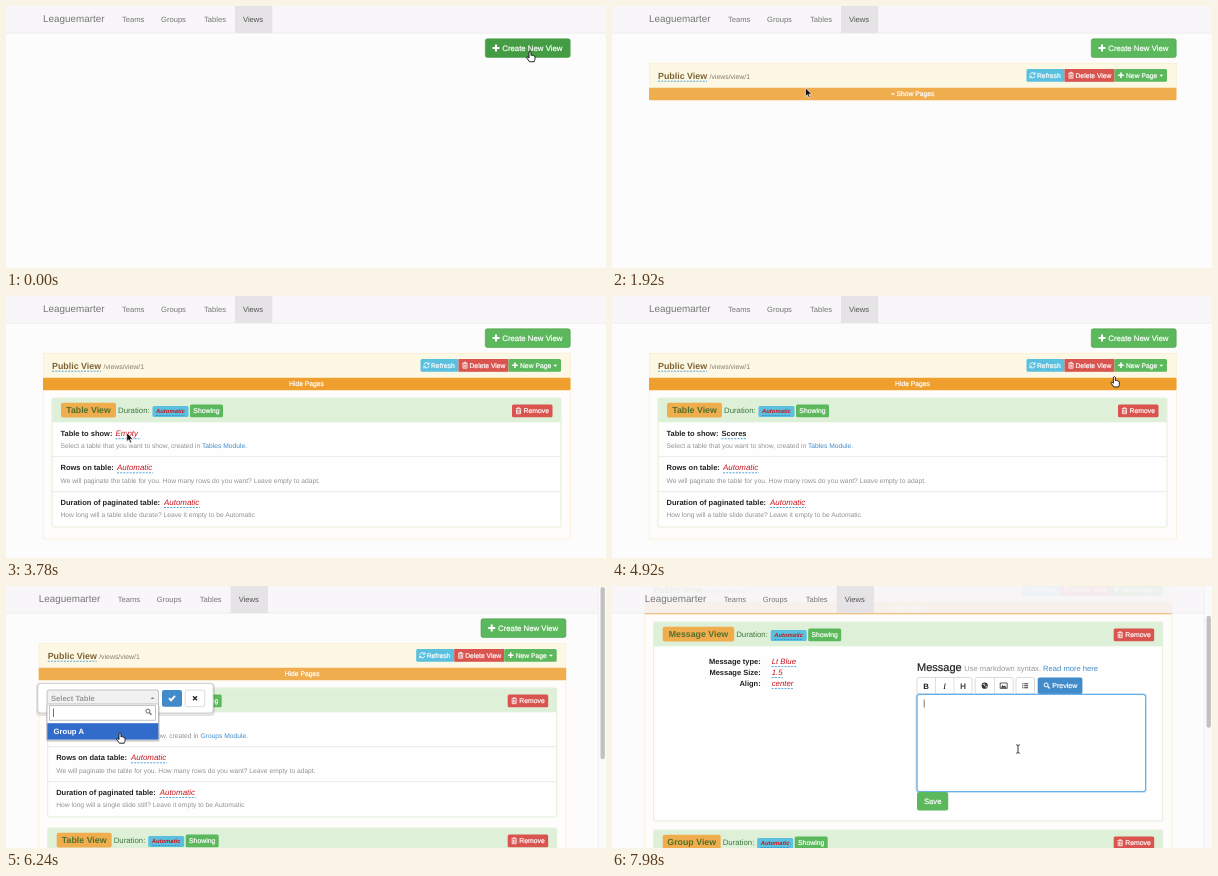
Write an HTML page that moves like this. It is 600 px wide and 262 px high and loops after 8000 ms.

```html
<!DOCTYPE html>
<html lang="en">
<head>
<meta charset="utf-8">
<title>View editor</title>
<style>
  html, body { margin: 0; width: 100%; height: 100%; overflow: hidden; background: #fdfcfd; }
  svg { display: block; width: 600px; height: 262px; }
  text { font-family: "Liberation Sans", Arial, sans-serif; text-rendering: geometricPrecision; white-space: pre; }
  .bold { font-weight: 700; }
  .italic { font-style: italic; }
  .mid { text-anchor: middle; }
  .end { text-anchor: end; }
  .solid { stroke: currentColor; stroke-width: .2; }
</style>
</head>
<body>
<svg id="stage" viewBox="0 0 600 262" xmlns="http://www.w3.org/2000/svg"></svg>
<script>
const C = {
  green: '#5cb85c', greenDark: '#449d44', red: '#d9534f', cyan: '#5bc0de', orange: '#f0ad4e',
  orangeDark: '#ee9f2e', blue: '#428bca', focus: '#66afe9', leaf: '#3c763d', value: '#c9151e',
  ink: '#333', muted: '#999', cream: '#fcf8e3', creamLine: '#faebcc', mint: '#dff0d8', mintLine: '#d6e9c6'
};
const NAV = [[116, 'Teams'], [155, 'Groups'], [198, 'Tables'], [237, 'Views']];
const MENU = ['Table View', 'Group View', 'Message View'];

// Drawing helpers
const rect = (x, y, w, h, fill, more = '') => `<rect x="${x}" y="${y}" width="${w}" height="${h}" fill="${fill}" ${more}/>`;
const text = (x, y, size, str, fill, cls = '') =>
  `<text x="${x}" y="${y}" font-size="${size}" fill="${fill}" color="${fill}" class="${cls}">${str}</text>`;
const group = (id, body) => `<g id="${id}">${body}</g>`;
const dashes = (x, y, w) => `<path d="M${x} ${y}h${w}" stroke="#2a8fd0" stroke-width=".8" stroke-dasharray="2 1.2"/>`;
const stroke = (d, color, w = 1) => `<path d="${d}" fill="none" stroke="${color}" stroke-width="${w}"/>`;
const at = (x, y, body) => `<g transform="translate(${x} ${y})">${body}</g>`;
const box = (x, y, w, h, line = '#ccc', r = 2) => rect(x, y, w, h, '#fff', `rx="${r}" stroke="${line}" stroke-width=".7"`);

const icon = {
  plus: (x, y, s = 1) => at(x, y, stroke(`M${-3.5 * s} 0h${7 * s}M0 ${-3.5 * s}v${7 * s}`, '#fff', 2 * s)),
  refresh: (x, y) => at(x, y, stroke('M-2.6-.5A2.7 2.7 0 0 1 2-1.8M2.6.5A2.7 2.7 0 0 1-2 1.8M2.6-3v2h-2M-2.6 3v-2h2', '#fff', .9)),
  trash: (x, y) => at(x, y, stroke('M-2.7-2h5.4M-1-2v-1h2v1M-2-1.4v4.3h4v-4.3M-.7-.8v2.8M.7-.8v2.8', '#fff', .8)),
  caret: (x, y, fill = '#fff', up = 1) => at(x, y, `<path d="M-2 ${-up}h4L0 ${up}z" fill="${fill}"/>`),
  search: (x, y, color) => at(x, y, `<circle cx="-.6" cy="-.6" r="2" fill="none" stroke="${color}"/>` + stroke('M1 1l2 2', color, 1.3)),
  cross: (x, y, color, s = 2) => at(x, y, stroke(`M${-s}-${s}L${s} ${s}M${s}-${s}L${-s} ${s}`, color, 1.3)),
  check: (x, y) => at(x, y, stroke('M-3 0L-1 2.2 3-2.4', '#fff', 1.8)),
  globe: (x, y) => at(x, y, `<circle r="3.1" fill="#333"/>` + stroke('M-2-.8l1.4-1 1 .9-.8 1.2M.8.6l1.3.2-.9 1.2', '#fff', .8)),
  picture: (x, y) => at(x, y, stroke('M-3.5-2.7h7v5.4h-7z', '#333', .8) + '<path d="M-2.8 2L-1-.7.2.7 1.3-.3 2.8 2z" fill="#333"/>'),
  list: (x, y) => at(x, y, stroke('M-3-2h1.2M-1-2h4M-3 0h1.2M-1 0h4M-3 2h1.2M-1 2h4', '#333', 1.1))
};

const navbar = () =>
  rect(0, 0, 600, 27, '#f8f6f8', 'opacity=".93"') + rect(0, 26.8, 600, .6, '#e6e3e6') +
  group('navItems', rect(229, 0, 37.3, 27, '#e5e3e5') + text(37, 16.3, 9.9, 'Leaguemarter', '#777') +
    NAV.map(([x, s]) => text(x, 15.8, 7.6, s, s === 'Views' ? '#555' : '#777')).join(''));

const viewHeader = () =>
  rect(37.2, 57.2, 527, 29, C.cream, `stroke="${C.creamLine}" stroke-width=".6"`) +
  group('plainTitle', text(46, 72.8, 8.9, '', '#7d6235', 'bold titleText') +
    dashes(46, 75.2, 49) + text(97.5, 72.8, 6.9, '/views/view/1', '#867b70')) +
  group('titleForm', rect(45, 62, 93, 19, C.focus, 'rx="3" opacity=".3"') + box(46, 63, 91, 17, C.focus) +
    group('selection', rect(51, 67.5, 37, 9, '#a5cdf4')) +
    `<text id="typed" x="51.5" y="74.3" font-size="6.8" fill="#333" class="bold"></text>` +
    '<circle cx="130" cy="71.7" r="2.8" fill="none" stroke="#aaa"/>' + icon.cross(130, 71.7, '#aaa', 1.1) +
    text(139, 74.2, 6.9, '/views/view/1', '#867b70')) +
  rect(414.5, 63, 38, 12.8, C.cyan, 'rx="1.5"') + rect(452.5, 63, 50, 12.8, C.red) +
  `<rect id="newPage" x="502.5" y="63" width="52.5" height="12.8" rx="1.5"/>` +
  icon.refresh(420.5, 69.3) + icon.trash(459, 69.3) + icon.plus(509, 69.3, .8) + icon.caret(549.3, 69.8) +
  [[425, 'Refresh'], [463.5, 'Delete View'], [514, 'New Page']]
    .map(([x, s]) => text(x, 71.8, 6.75, s, '#fff', 'solid')).join('');

const pagesBar = () => group('bar',
  `<rect id="barFill" x="37" y="81.7" width="527.5" height="12.5" rx="1"/>` +
  group('barFocus', rect(37.2, 81.9, 527, 12.1, 'none', 'rx="1" stroke="#5c9dd8" stroke-width="1.6"')) +
  group('showPages', icon.caret(281, 88.3) + text(303.5, 90.4, 6.77, 'Show Pages', '#fff', 'mid solid')) +
  group('hidePages', text(300.5, 90.4, 6.77, 'Hide Pages', '#fff', 'mid solid')));

function pageFrame(name, labelWidth, height) {
  const status = dashes(150, 119.5, 29) ;
  return rect(46, 102, 509, height, '#fefefe', `stroke="${C.mintLine}" stroke-width=".7" rx="1.5"`) +
    rect(46.3, 102.3, 508.4, 24, C.mint) +
    rect(55, 106.8, labelWidth, 14.7, C.orange, 'rx="2"') +
    text(55 + labelWidth / 2, 117.2, 8.8, name, '#50702c', 'bold mid') +
    at(labelWidth - 55, 0, text(112, 117, 7.8, 'Duration:', C.leaf) +
      rect(146.5, 110, 36, 11, C.cyan, 'rx="1.5"') + text(150, 117.4, 5.9, 'Automatic', C.value, 'bold italic') + status +
      rect(184, 108.5, 33, 12.7, C.green, 'rx="1.5"') + text(200.5, 117.3, 6.85, 'Showing', '#fff', 'mid solid')) +
    rect(506, 108.5, 40.5, 12.7, C.red, 'rx="1.5"') + icon.trash(512.5, 114.8) +
    text(517.5, 117.3, 6.85, 'Remove', '#fff', 'solid');
}

const row = (y, label, note, valueX) =>
  text(54.5, y, 7.5, label, '#222', 'bold') + text(54.5, y + 12.7, 6.7, note, '#929292') +
  (valueX ? text(valueX, y, 7.95, 'Automatic', C.value, 'italic') + dashes(valueX, y + 2.8, 36) : '');

const listPage = (kind, name, labelWidth, chosen, wide, second, third) => group(kind + 'Page',
  pageFrame(name, labelWidth, 129) +
  [160.5, 195.5].map(y => rect(46, y, 509, .6, '#dcdfdc')).join('') +
  row(139.7, name.split(' ')[0] + ' to show:',
    `Select a ${kind} that you want to show, created in <tspan fill="${C.blue}">${name.split(' ')[0]}s Module.</tspan>`) +
  group(kind + 'Empty', text(wide, 139.7, 7.95, 'Empty', C.value, 'italic') + dashes(wide, 142.7, 24)) +
  group(kind + 'Chosen', text(wide, 139.7, 7.5, chosen, '#222', 'bold') + dashes(wide, 142.7, 25)) +
  row(174, ...second) + row(208.7, ...third));

const PAGINATE = 'We will paginate the table for you. How many rows do you want? Leave empty to adapt.';
const messagePage = () => group('messagePage',
  pageFrame('Message View', 71.5, 199) +
  [['Message type:', 'Lt Blue', 25], ['Message Size:', '1.5', 11], ['Align:', 'center', 22]].map(([k, v, w], i) =>
    text(153, 144 + 11 * i, 7.5, k, '#222', 'bold end') + text(164, 144 + 11 * i, 7.8, v, C.value, 'italic') +
    dashes(164, 146.6 + 11 * i, w)).join('') +
  text(309.3, 150.5, 11, 'Message', '#222', 'solid') +
  text(356.5, 150.5, 7.6, `Use markdown syntax. <tspan fill="${C.blue}">Read more here</tspan>`, '#999') +
  box(309.3, 157.5, 55, 16.5) + box(367.5, 157.5, 38, 16.5) + box(408.3, 157.5, 18.5, 16.5) +
  [327.7, 346, 386.5].map(x => rect(x, 157.5, .6, 16.5, '#ccc')).join('') +
  text(318.5, 168.5, 7.8, 'B', '#222', 'bold mid') +
  `<text x="337" y="168.5" font-size="8" class="italic mid" style="font-family:'Liberation Serif',serif">I</text>` +
  text(355.5, 168.5, 7.8, 'H', '#222', 'mid solid') +
  icon.globe(377, 165.7) + icon.picture(396, 165.7) + icon.list(417.5, 165.7) +
  rect(430, 157.5, 44.7, 16.7, C.blue, 'rx="2"') + icon.search(439, 165.5, '#fff') + text(444.5, 168.3, 7.1, 'Preview', '#fff', 'solid') +
  box(309.3, 174.5, 228.5, 97, '#bbb') +
  group('areaFocus', rect(308.8, 174, 229.5, 98, 'none', `rx="3" stroke="${C.focus}" stroke-width="2" opacity=".35"`) +
    rect(309.3, 174.5, 228.5, 97, 'none', `rx="2" stroke="${C.focus}"`) + rect(316.1, 179.5, .7, 8, '#444')) +
  rect(309.3, 272, 31.2, 18.5, C.green, 'rx="2"') + text(325, 284, 7.7, 'Save', '#fff', 'mid solid'));

const menu = () => group('menu',
  rect(466, 79, 90, 51, '#000', 'rx="3" opacity=".08"') + box(465, 77, 90, 50.5, '#ccc') +
  '<rect id="menuHover" x="465.4" width="89.2" height="14.6" fill="#f0f0f0"/>' +
  MENU.map((s, i) => text(476, 90 + 14.6 * i, 7.6, s, C.ink)).join(''));

const popover = () => group('popover',
  rect(30, 97, 179, 33, '#000', 'rx="4" opacity=".1"') + box(31.8, 97.3, 175.4, 29.7, '#bbb', 3) +
  rect(41, 104, 111.5, 15.5, '#f1f1f1', 'stroke="#aaa" stroke-width=".7" rx="2"') +
  '<text id="choice" x="45" y="114.7" font-size="7.6" class="bold"></text>' +
  rect(156, 104, 20, 16.7, C.blue, 'rx="2"') + icon.check(166, 112.2) +
  box(179.2, 104, 19.6, 16.7) + icon.cross(189, 112.3, '#222') +
  group('drop', icon.caret(146.5, 112, '#888', -1) +
    rect(40, 119, 114, 37, '#000', 'rx="2" opacity=".12"') + box(41, 118, 111.5, 36, '#aaa', 1) +
    box(43.5, 119.7, 106, 14.5, '#aaa', 0) + rect(47, 122.5, .7, 8.5, '#333') + icon.search(142.5, 125.7, '#666') +
    rect(41.3, 137.2, 111, 16.4, '#316ccb') + '<text id="option" x="47.5" y="147.6" font-size="7.7" fill="#fff" class="bold"></text>'));

const cursors = () => group('cursor',
  group('hand', '<path d="M-1 .6Q0-.9 1 .6V4l.5-.3q.9-.4 1.2.4.9-.3 1.2.5 1.1-.2 1.1.9v2.2q0 1-.7 1.6V10.2H-.6L-3.2 6.6q-.6-1 .4-1.2.7 0 1.8 1.1z" fill="#fff" stroke="#111" stroke-width=".9"/>') +
  group('arrow', '<path d="M0 0v9l2.1-1.9 1.4 3.2 1.5-.7-1.4-3.1h2.9z" fill="#111" stroke="#fff" stroke-width=".7"/>') +
  group('beam', stroke('M-1.8-4.2Q0-4.2 0-3.2V3.2Q0 4.2-1.8 4.2M1.8-4.2Q0-4.2 0-3.2M0 3.2Q0 4.2 1.8 4.2', '#222', .9)));

stage.innerHTML = rect(0, 0, 600, 262, '#fdfcfd') +
  group('content',
    '<rect id="create" x="479.3" y="32.8" width="84.9" height="18.6" rx="2" stroke="#449d44" stroke-width=".6"/>' +
    icon.plus(490, 42) + text(496.3, 44.8, 7.8, 'Create New View', '#fff', 'solid') +
    group('view',
      `<rect id="body" x="37.2" y="88" width="527" fill="#fefdfb" stroke="${C.creamLine}" stroke-width=".7"/>` +
      viewHeader() + pagesBar() +
      listPage('table', 'Table View', 55, 'Scores', 109.5,
        ['Rows on table:', PAGINATE, 111],
        ['Duration of paginated table:', 'How long will a table slide durate? Leave it empty to be Automatic', 158]) +
      listPage('group', 'Group View', 58, 'Group A', 114,
        ['Rows on data table:', PAGINATE, 129.3],
        ['Duration of paginated table:', 'How long will a single slide still? Leave it empty to be Automatic', 158]) +
      messagePage() + menu())) +
  navbar() + popover() +
  group('scrollbar', rect(591.8, 0, 8.2, 262, '#fafafa') + rect(591.8, 0, .5, 262, '#e8e8e8') +
    '<rect id="thumb" x="594.5" width="4.4" rx="2.2" fill="#c1c1c1"/>') +
  cursors();

// Pointer stops: time, x, y, shape used from then on
const PATH = [
  [0, 524, 45.5, 'hand'], [220, 524, 45.5, 'arrow'], [580, 72, 70, 'hand'], [700, 72, 70, ''],
  [1740, 76, 74, 'arrow'], [2080, 290, 88, 'hand'], [2200, 290, 88, 'hand'], [2460, 508, 68.5, 'hand'],
  [2700, 508, 68.5, 'hand'], [3000, 492, 86, 'hand'], [3420, 492, 86, 'arrow'], [3800, 118, 137, 'hand'],
  [3960, 118, 137, 'arrow'], [4080, 100, 111, 'arrow'], [4300, 108, 146, 'hand'], [4400, 108, 146, 'arrow'],
  [4540, 166, 111, 'hand'], [4620, 166, 111, 'arrow'], [4900, 502, 81.5, 'hand'], [5040, 508, 69, 'hand'],
  [5160, 508, 69, 'hand'], [5380, 490, 101, 'hand'], [5580, 490, 101, 'arrow'], [5860, 120, 137, 'hand'],
  [5980, 120, 137, 'arrow'], [6080, 105, 111, 'arrow'], [6220, 114, 147, 'hand'], [6320, 114, 147, 'arrow'],
  [6460, 166, 111, 'hand'], [6540, 166, 111, 'arrow'], [6720, 505, 69, 'hand'], [6820, 505, 69, 'hand'],
  [6980, 486, 116, 'hand'], [7100, 486, 116, 'arrow'], [7260, 440, 195, 'beam'], [7360, 426, 207, 'beam'],
  [7620, 426, 207, 'beam'], [7860, 406, 163, 'beam'], [8000, 406, 163, 'beam']
];
const $ = id => document.getElementById(id);
const show = (id, on) => $(id).setAttribute('display', on ? 'inline' : 'none');
const set = (id, name, value) => $(id).setAttribute(name, value);
const move = (id, x, y) => set(id, 'transform', `translate(${x} ${y})`);
const during = (t, ...spans) => spans.some(([a, b]) => t >= a && t < b);
const ease = (t, a, b) => { const p = Math.min(1, Math.max(0, (t - a) / (b - a))); return p * p * (3 - 2 * p); };

function pointer(t) {
  const i = PATH.findIndex((p, k) => k === PATH.length - 1 || t < PATH[k + 1][0]);
  const [t0, x0, y0, shape] = PATH[i], [t1, x1, y1] = PATH[Math.min(i + 1, PATH.length - 1)];
  const p = ease(t, t0, t1 || t0 + 1);
  return { x: x0 + (x1 - x0) * p, y: y0 + (y1 - y0) * p, shape };
}

function render(t) {
  const mouse = pointer(t);
  const editing = during(t, [660, 1740]);
  const open = t >= 2160, hasTable = t >= 3420, hasGroup = t >= 5580, hasMessage = t >= 7080;
  const scroll = 66 * ease(t, 7620, 7860), shift = hasGroup ? -4.3 : 0;

  move('content', shift, -scroll);
  move('navItems', shift, 0);
  set('create', 'fill', t < 260 ? C.greenDark : C.green);
  show('view', t >= 180);

  // Title editing
  const name = 'Public View', renamed = t >= 1740;
  show('plainTitle', !editing);
  show('titleForm', editing);
  show('selection', t < 1000);
  document.querySelector('.titleText').textContent = renamed ? name : '[View Title]';
  $('typed').textContent = t < 1000 ? '[View Title]' : name.slice(0, Math.ceil((t - 1000) / 52));

  // Page list
  move('bar', 0, editing ? 4.5 : 0);
  set('barFill', 'fill', during(t, [2080, 5580]) ? C.orangeDark : C.orange);
  show('barFocus', during(t, [2160, 2640]));
  show('showPages', !open);
  show('hidePages', open);
  const groupTop = hasMessage ? 208 : 0, tableTop = groupTop + (hasGroup ? 140 : 0);
  const stack = tableTop + (hasTable ? 140 : 0);
  show('body', open);
  set('body', 'height', 15 + stack);
  show('tablePage', hasTable);
  show('groupPage', hasGroup);
  show('messagePage', hasMessage);
  move('tablePage', 0, tableTop);
  move('groupPage', 0, groupTop);
  show('tableEmpty', t < 4600);
  show('tableChosen', t >= 4600);
  show('groupEmpty', t < 6520);
  show('groupChosen', t >= 6520);
  show('areaFocus', t >= 7900);

  // New Page menu
  const menuOpen = during(t, [2580, 3360], [5100, 5520], [6780, 7040]);
  const item = Math.floor((mouse.y - 80) / 14.6);
  show('menu', menuOpen);
  show('menuHover', item >= 0 && item < MENU.length);
  set('menuHover', 'y', 80 + 14.6 * item);
  set('newPage', 'fill', menuOpen || during(t, [2400, 2580], [5000, 5100], [6680, 6780]) ? C.greenDark : C.green);

  // Table picker
  const option = hasGroup ? 'Group A' : 'Scores';
  const picked = during(t, [4380, 4600], [6300, 6520]);
  show('popover', during(t, [3900, 4600], [5940, 6520]));
  show('drop', during(t, [4120, 4380], [6100, 6300]));
  $('option').textContent = option;
  $('choice').textContent = picked ? option : 'Select Table';
  set('choice', 'fill', picked ? '#444' : '#999');

  const pageHeight = 114 + stack;
  show('scrollbar', hasGroup);
  set('thumb', 'y', 1 + scroll * 262 / pageHeight);
  set('thumb', 'height', 262 * 262 / pageHeight - 2);

  move('cursor', mouse.x, mouse.y);
  for (const shape of ['hand', 'arrow', 'beam']) show(shape, mouse.shape === shape);
}

const start = performance.now();
function tick() {
  render((performance.now() - start) % 8000);
  requestAnimationFrame(tick);
}
tick();
</script>
</body>
</html>
```
